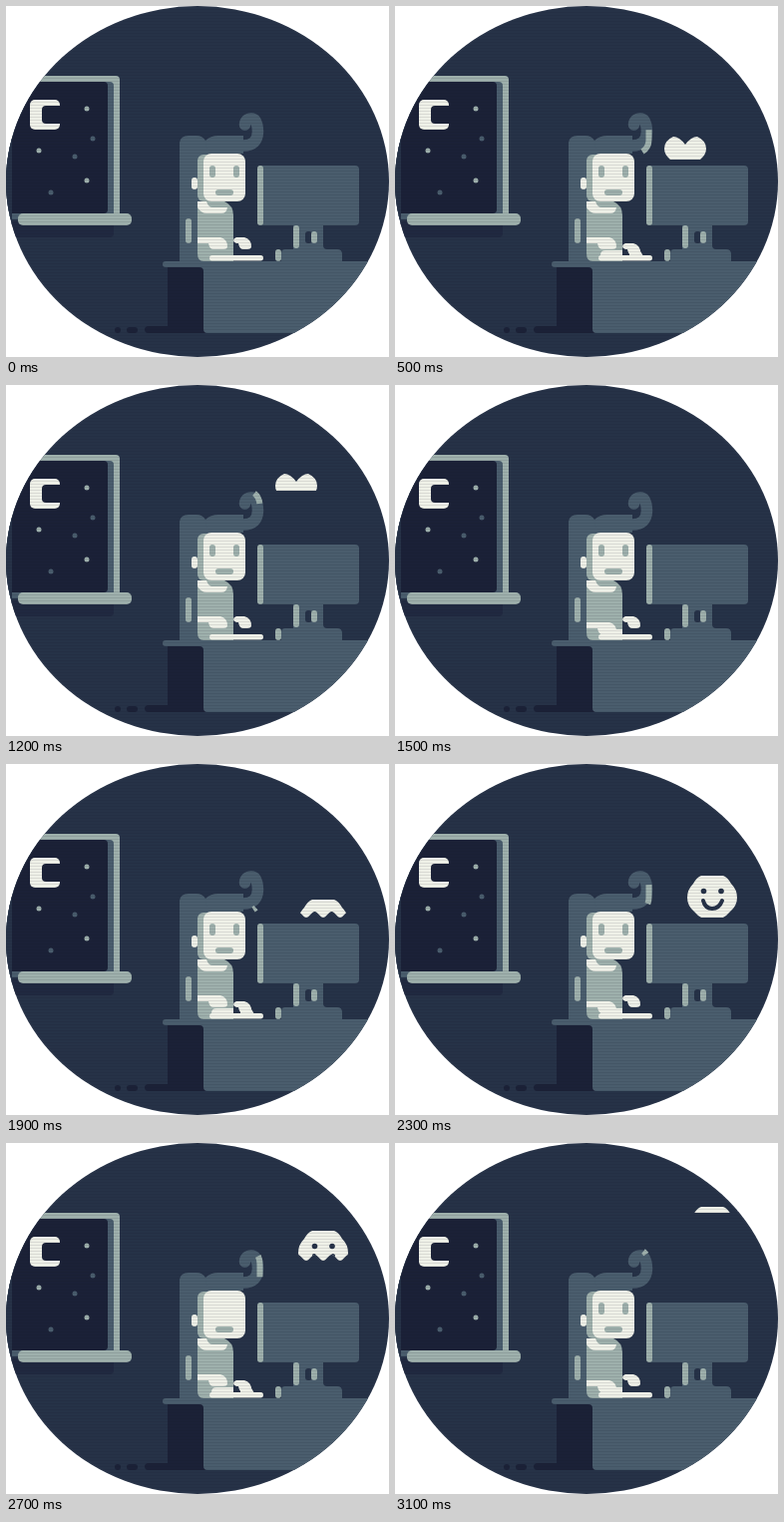
An HTML page that plays this animation: 384x352 px, repeating every 3.2 s.

```html
<!DOCTYPE html>
<html lang="en">
<head>
<meta charset="utf-8">
<title>Night work</title>
<style>
  html, body { margin: 0; height: 100%; overflow: hidden; background: #fff; }
  svg { display: block; width: 100vw; height: 100vh; }
  .wall { fill: #263247; }
  .dark { fill: #1b2137; }
  .shade { fill: #202940; }
  .mid { fill: #4a5d6d; }
  .light { fill: #9eb0ac; }
  .white { fill: #eff1e8; }
  .line { fill: none; stroke: #263247; stroke-width: 4; stroke-linecap: round; }
</style>
</head>
<body>
<svg viewBox="0 0 384 352">
  <defs>
    <clipPath id="stage"><ellipse cx="192" cy="176" rx="192" ry="176"/></clipPath>
    <clipPath id="wipe"><path id="wipeEdge"/></clipPath>
    <pattern id="scan" width="3" height="3" patternUnits="userSpaceOnUse">
      <rect width="3" height="1" fill="#10182c" opacity=".1"/>
    </pattern>
  </defs>

  <g clip-path="url(#stage)">
    <rect class="wall" width="384" height="352"/>

    <g id="window">
      <rect class="shade" x="5" y="216" width="103" height="16" rx="4"/>
      <rect class="light" x="-10" y="70" width="124" height="142" rx="4"/>
      <rect class="mid" x="-10" y="76" width="118" height="138" rx="4"/>
      <rect class="dark" x="-10" y="76" width="112" height="132" rx="4"/>
      <rect class="wall" y="76" width="6" height="145"/>
      <rect class="light" x="12" y="208" width="114" height="12" rx="5"/>
      <rect class="white" x="24" y="94" width="30" height="30" rx="5"/>
      <path class="dark" d="M55 100H40Q36 100 36 104V114Q36 118 40 118H55Z"/>
      <g class="light">
        <circle cx="81" cy="103" r="2.5"/><circle cx="33" cy="145" r="2.5"/><circle cx="81" cy="175" r="2.5"/>
      </g>
      <g class="mid">
        <circle cx="87" cy="133" r="2.5"/><circle cx="69" cy="151" r="2.5"/><circle cx="45" cy="187" r="2.5"/>
      </g>
    </g>

    <g id="desk">
      <g class="dark">
        <path d="M162 262H200V328H143Q139 328 139 324.500Q139 321 143 321H162Z"/>
        <rect x="121" y="322" width="11" height="6" rx="3"/>
        <rect x="109" y="322" width="6" height="6" rx="3"/>
      </g>
      <path class="mid" d="M160 256H384V328H202Q198 328 198 324V266Q198 262 194 262H160Q157 262 157 259T160 256Z"/>
      <rect class="mid" x="253" y="160" width="101" height="60" rx="4"/>
      <path class="mid" d="M288 218H318V240Q318 244 322 244H332Q337 244 337 249V257H276V248Q276 244 280 244H288Z"/>
      <rect class="light" x="252" y="160" width="6" height="60" rx="3"/>
      <rect class="light" x="288" y="220" width="6" height="23" rx="3"/>
      <rect class="light" x="270" y="244" width="6" height="12" rx="3"/>
      <rect class="wall" x="300" y="226" width="7" height="12" rx="3"/>
      <rect class="light" x="306" y="226" width="6" height="12" rx="3"/>
    </g>

    <g id="person">
      <path class="mid" d="M174 256V137Q175 130 183 130H191Q197 130 200 135Q205 130 213 130H238V148H206V256Z"/>
      <path d="M206 140H238Q252 140 252.500 126Q252 113 246 113Q240 113 239.500 119"
        fill="none" stroke="#4a5d6d" stroke-width="11.500" stroke-linecap="round"/>
      <path id="glint" d="M248 146Q254.500 142 254.500 134V122Q254.500 112 248 108"
        fill="none" stroke="#9eb0ac" stroke-width="6"/>
      <rect class="light" x="192" y="149" width="30" height="47" rx="6"/>
      <path class="light" d="M192 196H219Q228 200 228 210V256H198Q192 256 192 248Z"/>
      <rect class="white" x="198" y="148" width="42" height="48" rx="8"/>
      <rect class="white" x="186" y="172" width="6" height="12" rx="3"/>
      <path class="white" d="M192 196H201Q203 202 207 202H222Q221 208 216 208H201Q196 208 192 202Z"/>
      <g id="eyes" class="light">
        <rect x="204" y="160" width="6" height="12" rx="3"/>
        <rect x="228" y="160" width="6" height="12" rx="3"/>
      </g>
      <rect class="light" x="210" y="184" width="18" height="6" rx="3"/>
      <rect class="light" x="180" y="213" width="6" height="25" rx="3"/>
      <rect class="white" x="204" y="250" width="54" height="5.500" rx="2.700"/>
      <path id="leftHand" class="white" d="M192 232H215Q222 234 222 241Q222 244 218 244H208Q204 244 203 238H192Z"/>
      <path id="rightHand" class="white" d="M231 232H239Q246 234 246 241Q246 244 242 244H238Q234 244 233 238H231Q228 237 228 235T231 232Z"/>
      <g id="press" class="white">
        <path d="M206 250Q206 245 211 245H228V251H206Z"/>
        <path d="M235 250V244H245L249 251Z"/>
      </g>
    </g>

    <g clip-path="url(#wipe)">
      <path id="heart" class="white" d="M291 8Q297 0 303 0Q312 4 312 12Q312 18 306 23L294 35Q291 38 288 35L276 23Q270 18 270 12Q270 4 279 0Q285 0 291 8Z"/>
      <g id="smiley">
        <path class="white" d="M307 0H329Q333 1 337 8Q343 14 343 22Q343 30 336 36Q330 43 325 43H311Q306 43 300 36Q293 30 293 22Q293 14 299 8Q303 1 307 0Z"/>
        <circle class="wall" cx="309.500" cy="15.500" r="2.800"/>
        <circle class="wall" cx="327" cy="15.500" r="2.800"/>
        <path class="line" d="M309 25Q311 33 318 33T328 25"/>
      </g>
    </g>
    <rect width="384" height="352" fill="url(#scan)"/>
  </g>
</svg>

<script>
const $ = id => document.getElementById(id);
const LOOP = 3200, STEP = 100, SPEED = 0.06, EXIT = 154;

// Each glint key: time, start and end of the lit stretch along the curl.
const balloons = [
  { id: 'heart', from: 200, to: 1500, start: 117, vanish: 1483, wave: 0,
    glint: [[300, 0, 0], [500, 0, 24], [1200, 29, 41], [1500, 41, 41]] },
  { id: 'smiley', from: 1600, to: 3200, start: 1600, vanish: 3200, wave: 3,
    glint: [[1800, 0, 0], [1900, 0, 3], [2300, 8, 27], [2700, 14, 35], [3100, 37, 41]] }
];
const typing = ['up', 'right', 'up', 'right', 'up', 'right', 'left', 'left'];

function interpolate(keys, t) {
  const i = keys.findIndex(key => key[0] >= t);
  if (i < 0) return [0, 0];
  if (i === 0) return t === keys[0][0] ? keys[0].slice(1) : [0, 0];
  const a = keys[i - 1], b = keys[i], k = (t - a[0]) / (b[0] - a[0]);
  return [1, 2].map(n => a[n] + (b[n] - a[n]) * k);
}

function wipePath(bottom, amplitude) {
  let d = `M260 0V${bottom}`;
  for (let x = 260; x <= 350; x++) {
    d += `L${x} ${bottom + amplitude * (Math.cos((x - 318) * 2 * Math.PI / 17) - 1)}`;
  }
  return d + 'V0Z';
}

function show(id, visible) {
  $(id).setAttribute('visibility', visible ? 'visible' : 'hidden');
}

function render(t) {
  let lit = [0, 0];
  for (const b of balloons) {
    const active = t >= b.from && t < b.to;
    show(b.id, active);
    if (!active) continue;
    const top = EXIT - (t - b.start) * SPEED;
    const bottom = Math.min(EXIT, top + (b.vanish - t) * SPEED);
    const amplitude = top + 43 < EXIT + 2 && t < 2500 ? 0 :
      Math.max(0, Math.min(b.wave, (bottom - top - 6) / 4));
    $(b.id).setAttribute('transform', `translate(0 ${top})`);
    $('wipeEdge').setAttribute('d', wipePath(bottom, amplitude));
    lit = interpolate(b.glint, t);
  }
  const [start, end] = lit;
  show('glint', end > start);
  $('glint').setAttribute('stroke-dasharray', `0 ${start} ${end - start} 99`);

  const hand = typing[t / STEP % typing.length];
  for (const side of ['left', 'right']) {
    $(side + 'Hand').setAttribute('transform', `translate(0 ${hand === side ? 6 : 0})`);
  }
  const [leftPress, rightPress] = $('press').children;
  leftPress.setAttribute('visibility', hand === 'up' ? 'hidden' : 'visible');
  rightPress.setAttribute('visibility', hand === 'right' ? 'visible' : 'hidden');
  show('eyes', t < 2700 || t >= 2900);
}

const begin = performance.now();
function tick() {
  const t = (performance.now() - begin) % LOOP;
  render(Math.floor(t / STEP) * STEP);
  requestAnimationFrame(tick);
}
tick();
</script>
</body>
</html>
```
